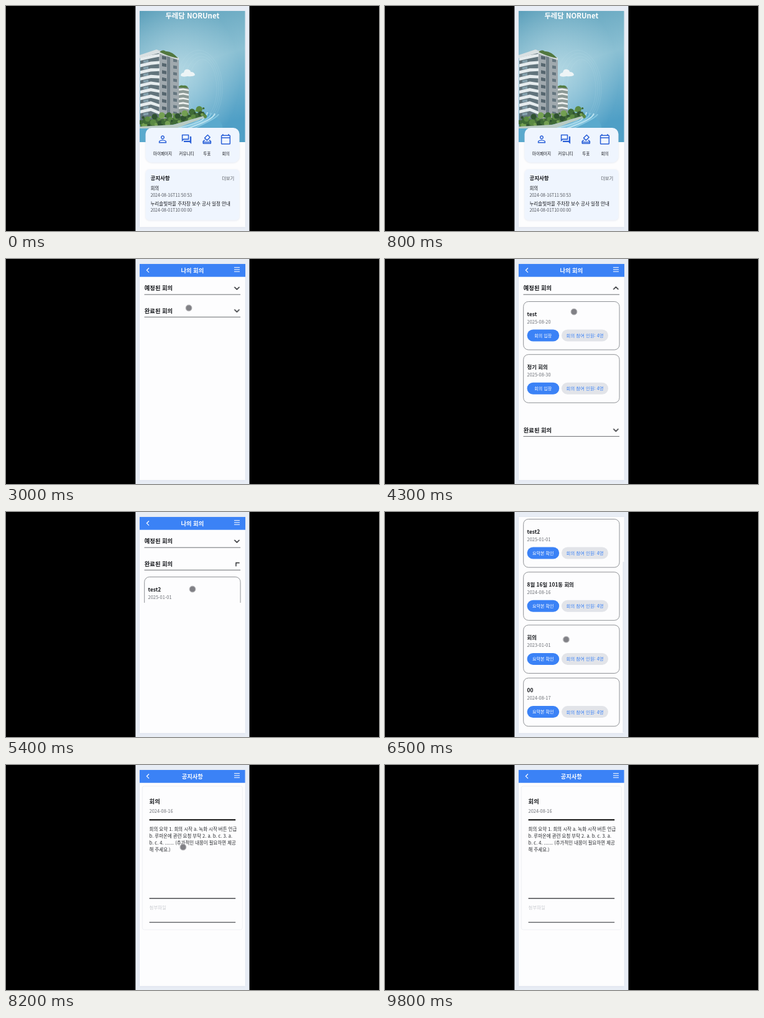
Animation, 600 px wide and 362 px high, one loop 9.9 s. Source, as an HTML page:

```html
<!DOCTYPE html>
<html lang="ko">
<head>
<meta charset="utf-8">
<title>Neighbourhood app</title>
<style>
html, body { margin: 0; width: 100%; height: 100%; overflow: hidden; background: #000; }
svg { display: block; width: 100vw; height: 100vh; }
text { font-family: 'Noto Sans CJK KR', 'Noto Sans CJK', 'Noto Sans', sans-serif; white-space: pre; }

.screen, .phase { animation: 9.9s step-end infinite; }
.home { animation-name: home; }
.meet { animation-name: meet; }
.list { animation-name: list; }
.post { animation-name: post; }
.empty { animation-name: empty; }
.full { animation-name: full; }
.bar { animation-name: bar; }
@keyframes home { 0% { visibility: visible } 25.25%, 100% { visibility: hidden } }
@keyframes meet { 0% { visibility: hidden } 25.25% { visibility: visible } 69.7%, 100% { visibility: hidden } }
@keyframes list { 0% { visibility: hidden } 69.7% { visibility: visible } 79.8%, 100% { visibility: hidden } }
@keyframes post { 0% { visibility: hidden } 79.8%, 100% { visibility: visible } }
@keyframes empty { 0% { visibility: hidden } 69.7% { visibility: visible } 73.74%, 100% { visibility: hidden } }
@keyframes full { 0% { visibility: hidden } 73.74% { visibility: visible } 79.8%, 100% { visibility: hidden } }
@keyframes bar { 0% { visibility: hidden } 57.58% { visibility: visible } 69.7%, 100% { visibility: hidden } }

.scroll, .thumb, .done, .clip1, .clip2, .turn1, .turn2, .touch { animation: 9.9s linear infinite; }
.scroll { animation-name: scroll; }
.thumb { animation-name: thumb; }
.done { animation-name: push; }
.clip1 { animation-name: open1; }
.clip2 { animation-name: open2; }
.turn1 { animation-name: turn1; }
.turn2 { animation-name: turn2; }
.touch { animation-name: touch; }
@keyframes scroll {
  0%, 59.6% { transform: none; animation-timing-function: ease-in-out }
  63.64%, 100% { transform: translateY(-93px) }
}
@keyframes thumb {
  0%, 59.6% { transform: none; animation-timing-function: ease-in-out }
  63.64%, 100% { transform: translateY(72px) }
}
@keyframes push {
  0%, 33.33% { transform: none; animation-timing-function: ease-in }
  37.37%, 45.45% { transform: translateY(192px); animation-timing-function: ease-out }
  48.48%, 100% { transform: none }
}
@keyframes open1 {
  0%, 33.33% { height: 0; animation-timing-function: ease-in }
  37.37%, 45.45% { height: 192px; animation-timing-function: ease-out }
  48.48%, 100% { height: 0 }
}
@keyframes open2 {
  0%, 52.53% { height: 0; animation-timing-function: ease-in }
  54.55% { height: 50.5px }
  57.58%, 100% { height: 360px }
}
@keyframes turn1 {
  0%, 33.33% { transform: rotate(0deg) }
  36.03%, 45.45% { transform: rotate(180deg) }
  48.15%, 100% { transform: rotate(0deg) }
}
@keyframes turn2 {
  0%, 52.53% { transform: rotate(0deg) }
  55.22%, 100% { transform: rotate(180deg) }
}
@keyframes touch {
  0%, 21.21% { transform: translate(400px, 240px) }
  23.74%, 25.25% { transform: translate(354px, 216px) }
  30.3% { transform: translate(294px, 79px) }
  32.32%, 34.34% { transform: translate(300px, 48px) }
  40.4%, 42.42% { transform: translate(306px, 110px) }
  44.95%, 46.46% { transform: translate(301px, 48px) }
  50.51%, 52.53% { transform: translate(299px, 84px) }
  54.55% { transform: translate(300px, 124px) }
  58.59% { transform: translate(295px, 196px) }
  60.61%, 65.66% { transform: translate(291.5px, 205px) }
  67.68%, 69.7% { transform: translate(256px, 236px) }
  72.73%, 73.74% { transform: translate(266px, 170.5px) }
  77.78%, 79.8% { transform: translate(262px, 105px) }
  84.85% { transform: translate(300px, 150px) }
  89.9%, 100% { transform: translate(400px, 140px) }
}
</style>
</head>
<body>
<svg id="stage" viewBox="0 0 600 362" preserveAspectRatio="none"></svg>
<script>
const BLUE = '#3b82f6', INK = '#15171b', GREY = '#6a6d73';

const text = (x, y, size, str, fill = INK, weight = 400, anchor = 'start') =>
  `<text x="${x}" y="${(y + size * 0.365).toFixed(2)}" font-size="${size}" fill="${fill}" font-weight="${weight}" text-anchor="${anchor}">${str}</text>`;
const rect = (x, y, w, h, fill, r = 0, extra = '') =>
  `<rect x="${x}" y="${y}" width="${w}" height="${h}" rx="${r}" fill="${fill}" ${extra}/>`;
const path = (d, fill, extra = '') => `<path d="${d}" fill="${fill}" ${extra}/>`;
const line = (d, color, width, extra = '') =>
  path(d, 'none', `stroke="${color}" stroke-width="${width}" ${extra}`);
const times = (n, fn) => Array.from({ length: n }, (_, i) => fn(i)).join('');
const group = (cls, ...parts) => `<g class="${cls}">${parts.join('')}</g>`;

const header = title =>
  rect(215, 8, 170, 20.7, BLUE) +
  line('M230 14.5l-3.6 3.6 3.6 3.6', '#fff', 1.2) +
  text(299.8, 18.5, 9.3, title, '#fff', 700, 'middle') +
  line('M367 13.6h9M367 16.9h9M367 20.2h9', '#fff', 1);

// Home screen
function photo() {
  const leaves = times(46, i => {
    const u = i / 45, x = 216 + u * 104;
    const y = 187 - 12 * u + 7 * Math.sin(i * 2.4) - (i > 36 ? 4 : 0);
    const color = ['#3f6b35', '#5b8a43', '#2f5230', '#74a052'][i % 4];
    return `<circle cx="${x.toFixed(1)}" cy="${y.toFixed(1)}" r="${3.4 + 1.8 * Math.sin(i * 5.1)}" fill="${color}"/>`;
  });
  const floors = times(9, i => {
    const a = 83 + i * 10.6, b = 77 + i * 11.6;
    return path(`M216 ${a}L233 ${a - 4}L247 ${b}v4.6L233 ${a + 1.2}L216 ${a + 5}z`, '#e6ecee') +
      path(`M221 ${a + 5}l8 -1.5v4l-8 1z`, '#85a1ad') +
      path(`M251 ${b + 3}l7 1.5v5l-7 -1z`, '#56666f') +
      path(`M269 ${b + 8 - i}l6 1v4.6l-6 -.8z`, '#65767f');
  });
  const small = times(5, i => {
    const y = 134 + i * 7.4;
    return path(`M273 ${y}l12 -1.6l9 2v2.4l-9 -1.6l-12 1.6z`, '#edf0ee');
  });
  return rect(215, 8, 170, 211, 'url(#sky)') + rect(215, 8, 170, 211, 'url(#glow)') +
    times(4, i => `<ellipse cx="${310 + i * 2}" cy="133" rx="${38 - i * 5}" ry="${62 - i * 5}" fill="none" stroke="#c8e6ef" stroke-opacity=".28" stroke-width=".5"/>`) +
    path('M281 112q0-4 5-5q1-6 7-5q4 1 4 4q6 0 7 5q-3 3-12 2q-8 2-11-1z', '#edf4f6') +
    path('M215 219V196L318 172q22 2 30 20q2 14-4 27z', '#5aa9cd') +
    times(5, i => line(`M${262 + i * 10} 197Q${316 + i * 6} ${192 - i * 3} ${318 + i * 6} ${170 + i}`, i % 2 ? '#b9e2f0' : '#86c6e0', 2.2)) +
    path('M273 132l12-4l9 4v42l-21 6z', '#8c9996') + small +
    path('M276 131q5-5 9-3q6-1 8 4z', '#547d42') +
    path('M216 80l30-9v118l-30-4z', '#62747c') +
    path('M246 71l32 13v97l-32 9z', '#a0a9ae') +
    path('M259 77l5 2v108l-5 1z', '#707f88') + floors +
    path('M215 79l27-9l36 13v4l-33-11l-30 8z', '#d9e0e2') +
    path('M247 74q5-5 10-1q9-1 20 11q-14-2-30-10z', '#52783f') +
    path('M216 184l52-4l50-10l4 7l-54 14l-52 6z', '#42683a') + leaves +
    path('M215 194l54-3l48-14l2 3l-46 17h-58z', '#b9cbc4');
}

const icon = (x, d) => `<g transform="translate(${x - 9.2} 205.2) scale(.765)">${path(d, '#2a60d8')}</g>`;
const home =
  rect(215, 8, 170, 348, '#fdfdfe') + photo() +
  text(299.8, 16, 11.4, '두레담 NORUnet', '#fff', 700, 'middle') +
  rect(224.5, 196, 151, 55.8, '#eff5fe', 10, 'filter="url(#soft)"') +
  icon(252, 'M12 5.9a2.1 2.1 0 1 1 0 4.2 2.1 2.1 0 0 1 0-4.2m0 9c2.97 0 6.1 1.46 6.1 2.1v1.1H5.9V17c0-.64 3.13-2.1 6.1-2.1M12 4C9.79 4 8 5.79 8 8s1.79 4 4 4 4-1.79 4-4-1.79-4-4-4m0 9c-2.67 0-8 1.34-8 4v3h16v-3c0-2.66-5.33-4-8-4z') +
  icon(290.5, 'M15 4v7H5.17L4 12.17V4h11m1-2H3c-.55 0-1 .45-1 1v14l4-4h10c.55 0 1-.45 1-1V3c0-.55-.45-1-1-1zm5 4h-2v9H6v2c0 .55.45 1 1 1h11l4 4V7c0-.55-.45-1-1-1z') +
  icon(323.3, 'M18 13h-.68l-2 2h1.91L19 17H5l1.78-2h2.05l-2-2H6l-3 3v4c0 1.1.89 2 1.99 2H19c1.1 0 2-.89 2-2v-4l-3-3zm1 7H5v-1h14v1zm-7.66-4.98c.39.39 1.02.39 1.41 0l6.36-6.36c.39-.39.39-1.02 0-1.41L14.16 2.3c-.38-.4-1.01-.4-1.4-.01L6.39 8.66c-.39.39-.39 1.02 0 1.41l4.95 4.95zm2.12-10.61L17 7.95l-4.95 4.95-3.54-3.54 4.95-4.95z') +
  icon(353.5, 'M20 3h-1V1h-2v2H7V1H5v2H4c-1.1 0-2 .9-2 2v16c0 1.1.9 2 2 2h16c1.1 0 2-.9 2-2V5c0-1.1-.9-2-2-2zm0 18H4V10h16v11zm0-13H4V5h16v3z') +
  text(252, 237.5, 6.6, '마이페이지', INK, 500, 'middle') +
  text(290.5, 237.5, 6.6, '커뮤니티', INK, 500, 'middle') +
  text(323.2, 237.5, 6.6, '투표', INK, 500, 'middle') +
  text(353.5, 237.5, 6.6, '회의', INK, 500, 'middle') +
  rect(224.5, 263, 151, 81.6, '#eff5fe', 6, 'filter="url(#soft)"') +
  text(232.4, 277.3, 8.5, '공지사항', INK, 700) +
  text(367.3, 277.3, 7.3, '더보기', '#50545b', 400, 'end') +
  text(232.4, 293.6, 7.5, '회의', INK, 500) +
  text(232.4, 304, 6.95, '2024-08-16T11:50:53', '#50545b') +
  text(232.4, 318, 7.55, '누리솔빛마을 주차장 보수 공사 일정 안내', INK, 500) +
  text(232.4, 328.5, 6.95, '2024-08-01T10:00:00', '#50545b');

// Meetings
const card = (y, title, date, action, note) =>
  rect(222.7, y, 154.4, 77.6, '#fdfdfe', 8, 'stroke="#83868b" stroke-width=".9"') +
  text(228.6, y + 20, 8.4, title, INK, 700) +
  text(228.6, y + 32.6, 7.4, date, GREY) +
  rect(228.6, y + 45, 51.6, 19, BLUE, 9.5) +
  text(254.2, y + 54.7, 7.1, action, '#fff', 500, 'middle') +
  rect(284, y + 45, 75, 19, '#e2e4e9', 9.5) +
  text(321.6, y + 54.7, 7.4, note, BLUE, 400, 'middle');
const cards = (top, rows, action) =>
  rows.map(([title, date], i) => card(top + i * 85.2, title, date, action, '회의 참여 인원: 4명')).join('');
const section = (y, title, turn) =>
  text(222.8, y, 9.3, title, INK, 700) + line(`M222.5 ${y + 10.2}h154.6`, '#6c6e73', 1) +
  `<g transform="translate(371.4 ${y})">${line('M-4 -2l4 4l4 -4', INK, 1.4, `class="${turn}"`)}</g>`;

const meet =
  rect(215, 8, 170, 348, '#fdfdfe') +
  group('scroll',
    header('나의 회의'),
    section(47, '예정된 회의', 'turn1'),
    `<g clip-path="url(#open1)">${cards(68.5, [['test', '2025-08-20'], ['정기 회의', '2025-08-30']], '회의 입장')}</g>`,
    group('done',
      section(83.2, '완료된 회의', 'turn2'),
      `<g clip-path="url(#open2)">${cards(104.5, [['test2', '2025-01-01'], ['8월 16일 101동 회의', '2024-08-16'], ['회의', '2023-01-01'], ['00', '2024-08-17']], '요약본 확인')}</g>`)) +
  group('phase bar', rect(382.6, 8, 1.8, 275, '#dce3ed', 0.9, 'class="thumb"'));

// Notices
const eye = y =>
  path(`M222.6 ${y}q3.7 -6 7.6 0q-3.9 6 -7.6 0z`, GREY) +
  `<circle cx="226.4" cy="${y}" r="1.7" fill="${GREY}" stroke="#fdfdfe" stroke-width=".7"/>`;
const item = (y, title, date, views) =>
  `<text x="222.6" y="${y + 12}" font-size="8.45" font-weight="500" fill="${INK}"><tspan fill="#4a7cc9" font-weight="400">[공지]</tspan> ${title}</text>` +
  text(222.6, y + 20.2, 6.65, date, GREY) + eye(y + 31.3) +
  text(233.8, y + 31.3, 6.8, views, GREY) + line(`M222.5 ${y + 40}h154.6`, '#ebecf0', 0.8);
const count = n => text(232.8, 51.6, 7.5, `총 ${n}건의 공지사항이 있습니다.`, GREY);
const pager = y => rect(290, y, 19.6, 19.4, BLUE, 3) + text(299.8, y + 9.8, 8, '1', '#fff', 400, 'middle');

const list =
  rect(215, 8, 170, 348, '#fdfdfe') + header('공지사항') +
  path('M222.6 54q1.2-1 1.2-3q.1-2.6 2.3-2.9q2.2.3 2.3 2.9q0 2 1.2 3zM225 54.5h2.2q-1.1 1.5-2.2 0z', '#5c5f65') +
  rect(222.7, 64.5, 154.4, 19.2, '#fdfdfe', 2, 'stroke="#e4e6ea" stroke-width=".8"') +
  `<circle cx="231.2" cy="73.2" r="2.5" fill="none" stroke="${GREY}" stroke-width="1.2"/>` +
  line('M233 75l3 3', GREY, 1.3) + text(241.8, 74.4, 7.5, '검색', '#8b8e94') +
  rect(222.5, 91.4, 154.6, 2, '#111') +
  group('phase empty', count(0), item(95.2, '존재하는 데이터가 없습니다.', '0000-00-00', '-1'), pager(140.3)) +
  group('phase full', count(2), item(95.2, '회의', '2024-08-16', '3'),
    item(135.8, '주차장 보수 공사 일정 안내', '2024-08-01', '8'), pager(181));

// Single notice
const body = ['회의 요약 1. 회의 시작 a. 녹화 시작 버튼 언급', 'b. 루마온에 관련 요청 부탁 2. a. b. c. 3. a.',
  'b. c. 4. ....... (추가적인 내용이 필요하면 제공', '해 주세요.)'];
const post =
  rect(215, 8, 170, 348, '#fdfdfe') + header('공지사항') +
  rect(219.3, 34, 161, 231, '#fdfdfe', 3, 'stroke="#eff0f3" stroke-width="1"') +
  text(230.6, 58.6, 9.3, '회의', INK, 700) +
  text(230.6, 74.7, 7.4, '2024-08-16', GREY) +
  rect(230.6, 87.2, 138.6, 2.1, '#111') +
  body.map((row, i) => text(230.6, 102.8 + i * 11.2, 7.45, row, '#25272b')).join('') +
  rect(230.6, 213.9, 138.6, 1.4, '#3a3c40') +
  text(230.6, 229, 7.4, '첨부파일', '#c9cbd0') +
  rect(230.6, 252.5, 138.6, 1.3, '#55575b');

document.getElementById('stage').innerHTML = `
<defs>
  <linearGradient id="sky" x1="0" y1="0" x2=".25" y2="1">
    <stop offset="0" stop-color="#5b9fba"/><stop offset=".5" stop-color="#8bc0d3"/><stop offset="1" stop-color="#4f9fc6"/>
  </linearGradient>
  <radialGradient id="glow" cx=".35" cy=".5" r=".6">
    <stop offset="0" stop-color="#cfe8ef" stop-opacity=".6"/><stop offset="1" stop-color="#cfe8ef" stop-opacity="0"/>
  </radialGradient>
  <filter id="soft"><feDropShadow dx="0" dy=".5" stdDeviation=".8" flood-color="#7f93b5" flood-opacity=".25"/></filter>
  <clipPath id="page">${rect(215, 8, 169.6, 347.4, '#fff')}</clipPath>
  <clipPath id="open1"><rect class="clip1" x="215" y="57.8" width="170" height="0"/></clipPath>
  <clipPath id="open2"><rect class="clip2" x="215" y="94" width="170" height="0"/></clipPath>
</defs>
${rect(0, 0, 600, 362, '#000')}
${rect(208.3, 0, 183.2, 362, '#e8edf5')}
${rect(215, 8, 169.6, 347.4, '#fdfdfe', 0, 'filter="url(#soft)"')}
<g clip-path="url(#page)">
  ${group('screen home', home)}
  ${group('screen meet', meet)}
  ${group('screen list', list)}
  ${group('screen post', post)}
  <g class="touch"><circle r="4.9" fill="#808085" stroke="#b4b4b8" stroke-width="1"/></g>
</g>`;
</script>
</body>
</html>
```
